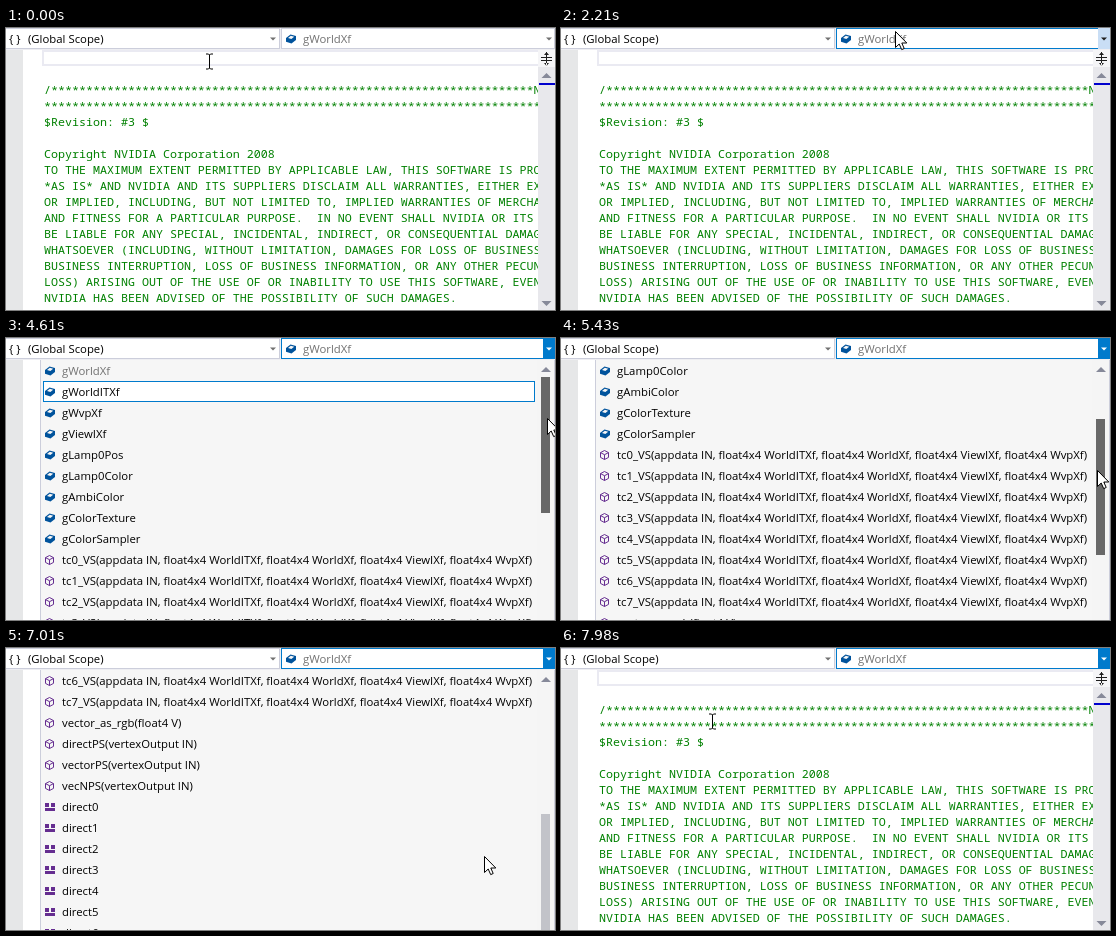
An HTML page that plays this animation: 549x282 px, repeating every 8 s.

```html
<!DOCTYPE html>
<html lang="en">
<head>
<meta charset="utf-8">
<title>Navigation bar</title>
<style>
  html, body { margin: 0; width: 100%; height: 100%; overflow: hidden; background: #fff; }
  svg { display: block; }
  text { white-space: pre; }
  .code { font: 11.667px "Noto Sans Mono", monospace; fill: #008000; }
  .ui { font: 11.35px "Open Sans", sans-serif; fill: #000; }
  .dim { fill: #717171; }
  .combo { fill: #fff; stroke: #cccedb; }
  .combo.hover, .combo.open { stroke: #007acc; }
  .drop { fill: none; }
  .drop.hover { fill: #c9def5; }
  .drop.open { fill: #007acc; }
  .glyph { fill: #717171; }
  .glyph.hover { fill: #1e1e1e; }
  .glyph.open { fill: #fff; }
</style>
</head>
<body>
<svg width="549" height="282" viewBox="0 0 549 282">
  <defs>
    <g id="field">
      <path d="M0 -1L4.5 -4.5L10 -3V1L5.5 4.5L0 2.7Z" fill="#00539c"/>
      <path d="M2 -1L4.8 -3.2L8.2 -2.3L5.4 0Z" fill="#f6f6f6"/>
    </g>
    <path id="method" d="M4.5 -4.5L8.5 -2.4V2.4L4.5 4.5L.5 2.4V-2.4ZM.5 -2.4L4.5 -.3L8.5 -2.4M4.5 -.3V4.5"
      fill="none" stroke="#652d90"/>
    <path id="tech" d="M0 -4H4V0H0ZM6 -4H10V0H6ZM0 1H10V4H0Z" fill="#652d90"/>
    <clipPath id="page"><rect x="18" y="22" width="514" height="260"/></clipPath>
    <clipPath id="popup"><rect x="35" y="22" width="496" height="260"/></clipPath>
  </defs>

  <rect width="549" height="22" fill="#eeeef2"/>
  <rect y="22" width="17" height="260" fill="#e6e7e8"/>
  <rect x="37" y="23" width="496" height="14" fill="none" stroke="#eaeaf2" stroke-width="2"/>
  <g id="code" class="code" clip-path="url(#page)"></g>
  <rect id="caret" x="38" y="22" width="1" height="15"/>

  <rect x="532" y="22" width="17" height="260" fill="#e8e8ec"/>
  <rect x="532" y="22" width="17" height="17" fill="#f5f5f7"/>
  <path d="M535 29H546V30H535ZM535 32H546V33H535ZM540 24H541V38H540ZM538 27L540.5 24L543 27ZM538 35L540.5 38L543 35Z" fill="#1e1e1e"/>
  <path d="M535.5 50L540.5 45L545.5 50ZM535.5 273L540.5 278L545.5 273Z" fill="#868999"/>
  <rect x="533" y="55" width="16" height="2" fill="#0000cd"/>

  <rect id="left" class="combo" x="-.5" y=".5" width="274" height="20"/>
  <text class="ui" x="3" y="14.5" font-weight="600">{ }</text>
  <text class="ui" x="22" y="15">(Global Scope)</text>
  <path class="glyph" d="M264 9.5H270L267 12.5Z"/>
  <rect id="right" class="combo" x="275.5" y=".5" width="273" height="20"/>
  <rect id="drop" class="drop" x="537" y="0" width="12" height="21"/>
  <path id="glyph" class="glyph" d="M540 9.5H546L543 12.5Z"/>
  <use href="#field" x="280" y="11"/>
  <text class="ui dim" x="297" y="15">gWorldXf</text>

  <g id="menu">
    <rect x="34" y="22" width="515" height="260" fill="#f6f6f6"/>
    <path d="M34.5 22V282M548.5 22V282" stroke="#cccedb"/>
    <rect x="531" y="22" width="17" height="260" fill="#f5f5f5"/>
    <path d="M535 34L540 29L545 34Z" fill="#868999"/>
    <rect id="thumb" x="535" width="9" height="136"/>
    <g clip-path="url(#popup)">
      <g id="list">
        <rect id="mark" x="37.5" width="491" height="20" fill="#fff" stroke="#007acc"/>
      </g>
    </g>
  </g>

  <path id="arrow" d="M.5 .5V16.5L4.2 13L6.7 18.6L9.2 17.5L6.8 12H11.8Z" fill="#fff" stroke="#000"/>
  <path id="beam" d="M-3.5 -7.5H-1L0 -6.5L1 -7.5H3.5M0 -6.5V6.5M-3.5 7.5H-1L0 6.5L1 7.5H3.5" fill="none" stroke="#000"/>
</svg>
<script>
const $ = id => document.getElementById(id);
const el = (parent, name, attrs, text = "") => {
  const node = document.createElementNS("http://www.w3.org/2000/svg", name);
  for (const key in attrs) node.setAttribute(key, attrs[key]);
  node.textContent = text;
  parent.append(node);
};

const lines = [
  "/" + "*".repeat(69) + "N",
  "*".repeat(72),
  "$Revision: #3 $",
  "",
  "Copyright NVIDIA Corporation 2008",
  "TO THE MAXIMUM EXTENT PERMITTED BY APPLICABLE LAW, THIS SOFTWARE IS PROVIDED",
  "*AS IS* AND NVIDIA AND ITS SUPPLIERS DISCLAIM ALL WARRANTIES, EITHER EXPRESS",
  "OR IMPLIED, INCLUDING, BUT NOT LIMITED TO, IMPLIED WARRANTIES OF MERCHANTABILITY",
  "AND FITNESS FOR A PARTICULAR PURPOSE.  IN NO EVENT SHALL NVIDIA OR ITS SUPPLIERS",
  "BE LIABLE FOR ANY SPECIAL, INCIDENTAL, INDIRECT, OR CONSEQUENTIAL DAMAGES",
  "WHATSOEVER (INCLUDING, WITHOUT LIMITATION, DAMAGES FOR LOSS OF BUSINESS PROFITS,",
  "BUSINESS INTERRUPTION, LOSS OF BUSINESS INFORMATION, OR ANY OTHER PECUNIARY",
  "LOSS) ARISING OUT OF THE USE OF OR INABILITY TO USE THIS SOFTWARE, EVEN IF",
  "NVIDIA HAS BEEN ADVISED OF THE POSSIBILITY OF SUCH DAMAGES."
];
lines.forEach((line, i) => el($("code"), "text", { x: 38, y: 66 + 16 * i }, line));

const fields = "gWorldXf gWorldITXf gWvpXf gViewIXf gLamp0Pos gLamp0Color gAmbiColor gColorTexture gColorSampler".split(" ");
const shaders = Array.from({ length: 8 }, (_, i) =>
  `tc${i}_VS(appdata IN, float4x4 WorldITXf, float4x4 WorldXf, float4x4 ViewIXf, float4x4 WvpXf)`);
const pixel = ["directPS", "vectorPS", "vecNPS"].map(name => name + "(vertexOutput IN)");
const items = [
  ...fields.map(name => ["field", name]),
  ...[...shaders, "vector_as_rgb(float4 V)", ...pixel].map(name => ["method", name]),
  ...Array.from({ length: 9 }, (_, i) => ["tech", "direct" + i])
];
items.forEach(([icon, name], i) => {
  const y = 33 + 21 * i;
  el($("list"), "use", { href: "#" + icon, x: 39, y });
  el($("list"), "text", { class: i ? "ui" : "ui dim", x: 56, y: y + 4 }, name);
});

// Pointer path: time, x, y
const path = [
  [0, 203, 33], [1630, 203, 33], [2210, 334, 3], [2400, 334, 3], [2480, 331, 7],
  [3660, 331, 7], [3820, 533, 62], [4230, 533, 62], [4280, 541, 73], [4460, 541, 73],
  [4610, 541, 80], [4850, 541, 80], [5430, 536, 132], [5630, 534, 150], [5690, 534, 150],
  [6020, 530, 180], [6440, 529, 201], [6500, 529, 201], [6770, 527, 208], [7009, 527, 208],
  [7010, 478, 208], [7400, 290, 130], [7810, 151, 73], [8000, 151, 73]
];
const pointer = t => {
  const i = path.findIndex(key => key[0] > t);
  const [a, b] = [path[i - 1], path[i]];
  const p = (t - a[0]) / (b[0] - a[0]);
  return [1, 2].map(k => Math.round(a[k] + (b[k] - a[k]) * p));
};

const within = (t, from, to) => t >= from && t < to;
const show = (id, on) => $(id).setAttribute("visibility", on ? "inherit" : "hidden");
const move = (id, x, y) => $(id).setAttribute("transform", `translate(${x} ${y})`);

function draw(t) {
  const [x, y] = pointer(t);
  const open = within(t, 2660, 7860);
  const offset = t < 4850 ? 0 : t < 6770 ? Math.max(0, Math.round((y - 86) / 8.45)) : 15;

  const state = t >= 2660 ? "open" : y < 21 && x >= 275 ? "hover" : "";
  $("left").setAttribute("class", "combo " + (t < 2660 && y < 21 && x < 273 ? "hover" : ""));
  $("right").setAttribute("class", "combo " + state);
  $("drop").setAttribute("class", "drop " + state);
  $("glyph").setAttribute("class", "glyph " + state);
  show("caret", within(t, 370, 900) || within(t, 1390, 1910) || within(t, 2440, 2660));

  show("menu", open);
  move("list", 0, -21 * offset);
  const row = Math.floor((y - 22) / 21);
  const item = t < 7050 ? Math.min(1, Math.max(0, row)) : offset + row;
  $("mark").setAttribute("y", 22.5 + 21 * item);
  $("thumb").setAttribute("y", Math.round(39 + 8.45 * offset));
  $("thumb").setAttribute("fill", within(t, 4230, 6770) ? "#686868" : "#c2c3c9");

  const beam = y >= 22 && (t < 2660 || t >= 7930);
  show("beam", beam);
  show("arrow", !beam);
  move("beam", x + .5, y + .5);
  move("arrow", x, y);
}

const start = performance.now();
function tick() {
  draw((performance.now() - start) % 8000);
  requestAnimationFrame(tick);
}
tick();
</script>
</body>
</html>
```
